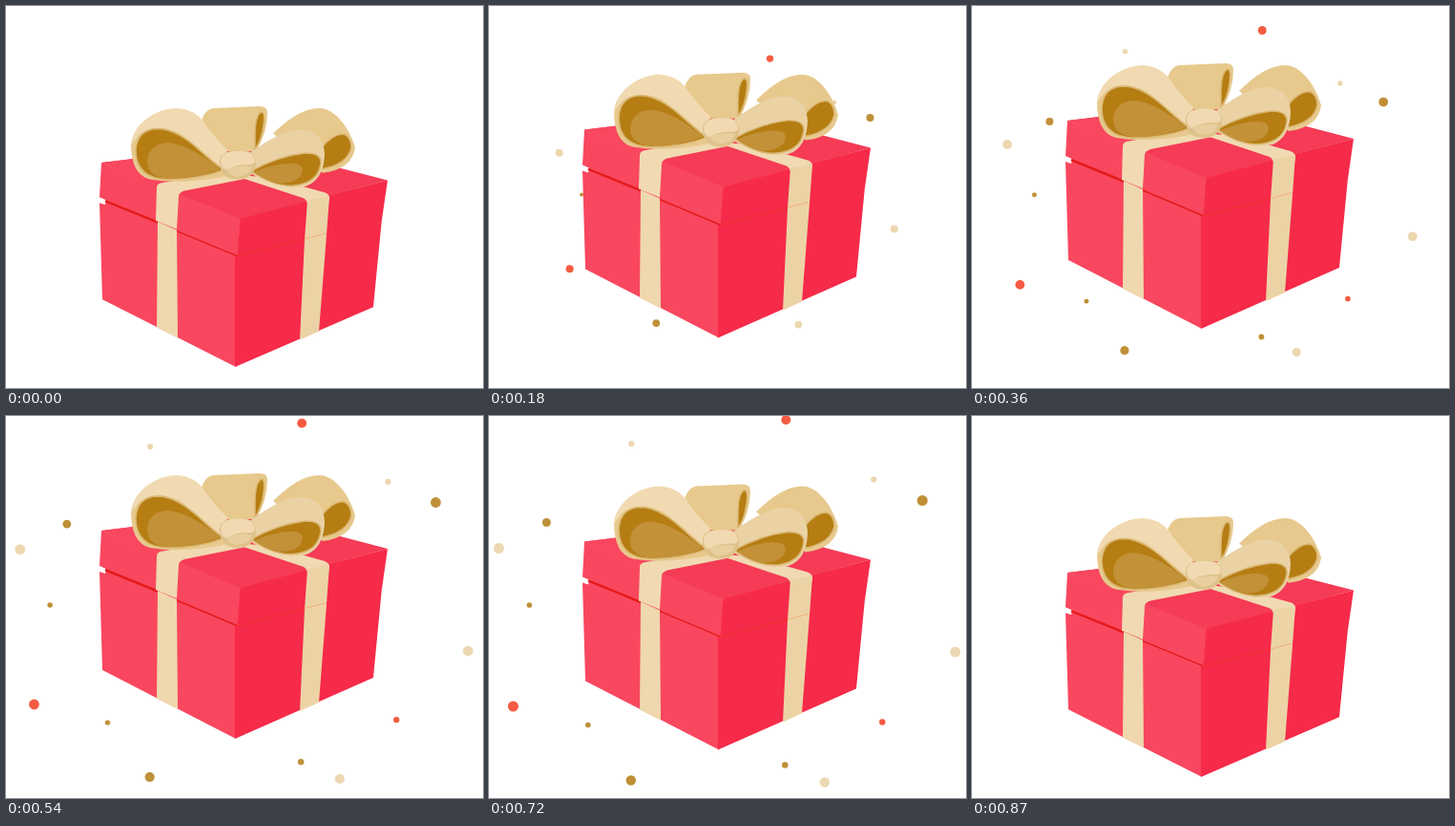
These frames come from a looping animation (500x400 px, 900 ms). An HTML page:

```html
<!DOCTYPE html>
<html lang="en">
<head>
<meta charset="utf-8">
<title>Gift box</title>
<style>
  html, body { margin: 0; width: 100%; height: 100%; overflow: hidden; background: #fff; }
  svg { display: block; width: 500px; height: 400px; }
  .light { fill: #f9475f; }
  .deep { fill: #f62a49; }
  .top { fill: #f53b56; }
  .cream { fill: #f1dab1; }
  .band { fill: #ecd3a6; }
  .tan { fill: #e7c98d; }
  .dark { fill: #b57d12; stroke: #d9b671; stroke-width: 1.5; }
  .gold { fill: #c29138; }
  .seam { fill: none; stroke: #e31b1c; }
</style>
</head>
<body>
<svg viewBox="0 0 500 400">
  <g id="dots"></g>
  <g id="gift">
    <!-- box -->
    <path class="light" d="M98 163L104 165L105 160L160 183L241 218V338L101 266Z"/>
    <path class="deep" d="M240 219L394 180L385 274L240 338Z"/>
    <path class="light" d="M100 120L246 179L243 220L98 157Z"/>
    <path class="deep" d="M245.500 179L400 139L394 181L242.500 220Z"/>
    <path class="top" d="M100 120L255 101L400 139L246 180Z"/>
    <path class="light" d="M100 120L134 116L190 135L158 144Z"/>
    <path class="seam" stroke-width="2.500" d="M104 161L160 184"/>
    <path class="seam" stroke-width="1.500" d="M179 193L242 219.500"/>
    <path class="seam" stroke-width="1" d="M242 220L313 201.500" style="stroke:#f0342f"/>
    <!-- ribbons -->
    <path fill="#efd8ad" d="M159 183L179 192L180 307L158 296Z"/>
    <path class="cream" d="M157 182L158 147Q158 143 162 142L225 130L262 135L187 150Q181 152 181 156L179 191Z"/>
    <path class="cream" d="M246 136L270 134L334 152Q339 154 339 158L338 164L316 168Q317 161 312 158Z"/>
    <path class="band" d="M316 160L339 156L336 197L328 300L308 309L313 202Z"/>
    <path fill="none" stroke="#f0b27c" d="M313 201.500L336 195.500"/>
    <!-- bow -->
    <path class="tan" d="M205 75Q209 63 217 62L266 60Q274 60 274 67Q274 88 262 108L228 108Z"/>
    <path class="dark" d="M261 92Q261 69 268 66Q272 67 270 80Q268 96 261 106Z"/>
    <path class="tan" d="M280 89Q307 62 328 62C344 62 359 81 366 104Q363 127 332 131Z"/>
    <path class="dark" d="M331 104Q344 88 355 90Q362 94 362 104Q358 122 331 127Z"/>
    <path class="tan" d="M131 100Q131 133 151 138Q186 144 233 134L214 100L150 76Z"/>
    <path class="cream" d="M131 102C131 84 152 62 180 62Q196 63 206 75Q218 93 232 106L228 127Q199 101 181 88Q153 76 136 93Z"/>
    <path class="dark" d="M136 108Q137 84 160 84Q179 85 202 106Q216 119 228 128Q202 138 169 138Q137 137 136 108Z"/>
    <path class="gold" d="M148 117Q151 99 171 99Q192 101 225 127Q201 137 169 137Q147 135 148 117Z"/>
    <path fill="#ead2a5" d="M254 111C283 90 296 85 311 85Q333 87 334 111Q333 138 315 145Q289 152 254 130Z"/>
    <path class="dark" d="M257 129Q286 113 314 110Q330 110 330 120Q328 140 306 144Q283 148 257 129Z"/>
    <path class="gold" d="M260 130Q285 120 302 121Q315 123 309 134Q302 143 285 142Q270 138 260 130Z"/>
    <g transform="translate(0 2)">
      <path fill="#dfc28a" d="M224 119Q222 106 242 105Q263 104 262 120Q260 136 241 136Q225 135 224 119Z"/>
      <path class="cream" d="M225 116Q226 106 243 105.500Q261 105 261 117Q260 121 252 120Q236 121 231 126Q225 124 225 116Z"/>
      <path fill="#e7cf9f" d="M231 125Q240 121 258 122Q256 132 242 133Q234 132 231 125Z"/>
    </g>
  </g>
</svg>
<script>
const LOOP = 900, STEP = 30;
const CX = 248.3, CY = 196, FLOOR = 338;
const RED = '#f55b42', GOLD = '#c09038', CREAM = '#edd7b1';

// Offset from the burst centre and radius, at full spread
const dots = [
  [63, -192, 5, RED], [-99, -167, 3.1, CREAM], [155, -129.5, 3.1, CREAM],
  [206, -107.5, 5.5, GOLD], [-188, -84.5, 4.5, GOLD], [-238, -57.5, 5.5, CREAM],
  [-206, 2, 2.8, GOLD], [240.5, 51, 5.5, CREAM], [-223, 108, 5.5, RED],
  [-144.5, 127.5, 2.8, GOLD], [164, 124.5, 3.2, RED], [62, 169.5, 3.3, GOLD],
  [-99.5, 185.5, 5.2, GOLD], [103.5, 187.5, 5.2, CREAM]
];
const burst = document.getElementById('dots');
const gift = document.getElementById('gift');
burst.innerHTML = dots.map(([x, y, r, fill]) =>
  `<circle cx="${x}" cy="${y}" r="${r}" fill="${fill}"/>`).join('');

// Keys are [time, value], joined by straight lines
const drop = [[0, 40], [240, -0.8], [300, 0], [660, 0], [870, 40], [900, 40]];
const stretch = [[0, .982], [120, .993], [240, 1.005], [300, 1], [720, 1], [870, .982], [900, .982]];

function along(keys, t) {
  const i = keys.findIndex(key => key[0] > t);
  const [t0, a] = keys[i - 1], [t1, b] = keys[i];
  return a + (b - a) * (t - t0) / (t1 - t0);
}

function spread(t) {
  if (t < 360) return .58 + .308 * t / 360;
  return 1 - .112 * Math.max(0, 1 - (t - 360) / 400) ** 3;
}

function draw(t) {
  const k = along(stretch, t);
  const y = FLOOR + along(drop, t) - FLOOR * k;
  gift.setAttribute('transform', `matrix(1 0 0 ${k} 0 ${y})`);
  burst.setAttribute('transform', `translate(${CX} ${CY}) scale(${spread(t)})`);
  burst.setAttribute('visibility', t >= 30 && t < 870 ? 'visible' : 'hidden');
}

const start = performance.now();
function tick() {
  const t = (performance.now() - start) % LOOP;
  draw(Math.floor(t / STEP) * STEP);
  requestAnimationFrame(tick);
}
tick();
</script>
</body>
</html>
```
